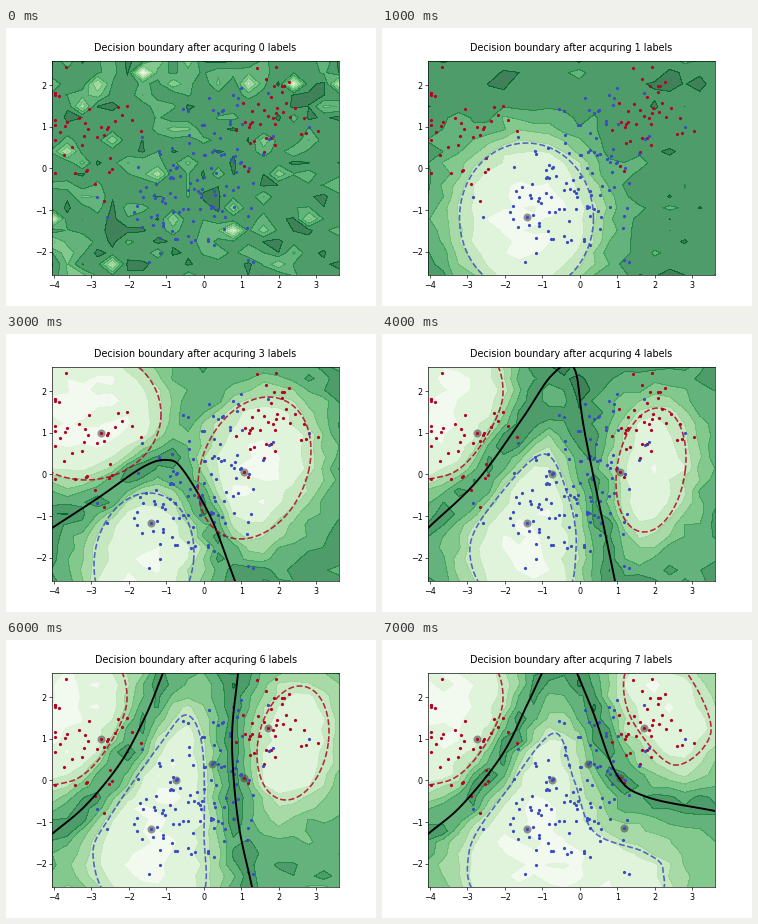
Write a matplotlib script that moves like this. It is 370 px wide and 278 px high and loops after 8 s.

```python
import numpy as np
import matplotlib.pyplot as plt
from matplotlib.animation import FuncAnimation
from matplotlib.path import Path

W, H, DPI = 370, 278, 64
PT = 72 / DPI                      # points per pixel
LEFT, RIGHT, TOP, BOTTOM = 46.25, 333, 33.36, 247.42
BLUE, RED = "#3b4cc0", "#b40426"
LEVELS = np.linspace(0, 1, 9)

plt.rcParams["font.family"] = "DejaVu Sans"
fig = plt.figure(figsize=(W / DPI, H / DPI), dpi=DPI, facecolor="white")
ax = fig.add_axes([LEFT / W, 1 - BOTTOM / H, (RIGHT - LEFT) / W, (BOTTOM - TOP) / H])


def to_data(x, y):
    """Stage pixels to plot units."""
    return (np.asarray(x) - 197.7) / 37.5, (140.5 - np.asarray(y)) / 41.65


def curve(*pts, closed=False):
    """Smooth curve through a few key points."""
    p = np.array(pts, float)
    if closed:
        p = np.vstack([p, p[:1]])
    m = np.gradient(p, axis=0)
    if closed:
        m[0] = m[-1] = (p[1] - p[-2]) / 2
    t = np.linspace(0, 1, 12)[:, None]
    h = t * t * (3 - 2 * t)
    return np.concatenate([
        (1 - h) * a + h * b + t * (1 - t) ** 2 * ma - t * t * (1 - t) * mb
        for a, b, ma, mb in zip(p, p[1:], m, m[1:])])


def loop(*pts):
    return curve(*pts, closed=True)


def ellipse(cx, cy, rx, ry, lean=0):
    """Ellipse whose top leans left by the given phase."""
    t = np.linspace(0, 2 * np.pi, 90)
    return np.column_stack([cx + rx * np.cos(t + lean), cy + ry * np.sin(t)])


# Data cloud: two classes of Gaussian clusters, in stage pixels
rng = np.random.default_rng(8)


def cluster(x, y, sx, sy, count):
    pts = rng.normal((x, y), (sx, sy), (count, 2))
    return np.clip(pts, (LEFT + 3, TOP + 4), (RIGHT - 3, BOTTOM - 4))


red = np.vstack([cluster(82, 102, 25, 28, 38), cluster(264, 92, 20, 25, 38)])
blue = np.vstack([cluster(160, 172, 22, 26, 56), cluster(222, 135, 25, 42, 66)])

# Labelled points in the order they are acquired
labels = [(145, 189, BLUE), (238, 138, RED), (95, 99, RED), (170, 140, BLUE),
          (206, 124, BLUE), (262, 88, RED), (242, 188, BLUE)]


def scene(far=0.8, borders=(), reds=(), blues=()):
    """far: uncertainty away from every confident region."""
    return dict(far=far, borders=borders,
                rings=[(c, RED) for c in reds] + [(c, BLUE) for c in blues])


left_border = curve((46, 194), (80, 165), (115, 122), (140, 75), (157, 33))
left_red = loop((20, 130), (62, 142), (97, 114), (121, 60), (100, 15), (20, 10))
tall_blue = loop((110, 262), (87, 215), (105, 175), (155, 103), (180, 75),
                 (196, 105), (198, 190), (192, 262))

scenes = [
    scene(),
    scene(0.82, blues=[ellipse(144.5, 190, 67, 75)]),
    scene(0.8, [curve((120, 33), (172, 115), (195, 180), (213, 247))],
          reds=[ellipse(249, 134, 56, 71, 0.25)],
          blues=[ellipse(134, 210, 49, 66)]),
    scene(0.8, [curve((46, 194), (92, 164), (137, 133), (161, 126), (177, 136),
                      (205, 184), (229, 247))],
          reds=[ellipse(80, 80, 75, 66), ellipse(248.5, 134, 56.5, 71, 0.25)],
          blues=[ellipse(138, 225, 50, 66, 0.1)]),
    scene(0.77, [curve((46, 194), (95, 147), (140, 85), (170, 41), (192, 34),
                       (203, 100), (233, 247))],
          reds=[left_red, ellipse(269, 136, 35, 62, 0.2)],
          blues=[loop((110, 262), (88, 212), (120, 158), (163, 120), (187, 165),
                      (194, 215), (180, 262))]),
    scene(0.71, [left_border, curve((260, 33), (237, 105), (230, 180), (239, 247))],
          reds=[left_red], blues=[tall_blue]),
    scene(0.68, [left_border, curve((232, 33), (226, 100), (232, 180), (246, 247))],
          reds=[left_red, ellipse(287, 103, 36, 57, 0.2)], blues=[tall_blue]),
    scene(0.62, [curve((46, 194), (80, 165), (120, 115), (145, 65), (160, 33)),
                 curve((195, 33), (211, 72), (235, 135), (265, 157), (333, 171))],
          reds=[left_red, loop((243, 33), (250, 80), (292, 125), (329, 92),
                               (305, 33), (270, 10))],
          blues=[loop((110, 262), (87, 212), (125, 150), (172, 93), (192, 140),
                      (212, 192), (262, 212), (281, 230), (262, 262))]),
]

gx, gy = np.meshgrid(np.linspace(LEFT, RIGHT, 20), np.linspace(BOTTOM, TOP, 20))
nodes = np.column_stack([gx.ravel(), gy.ravel()])


def distance(c):
    """Distance from every grid node to a curve."""
    d = np.hypot(gx[..., None] - c[:, 0], gy[..., None] - c[:, 1])
    return d.min(-1)


def uncertainty(n):
    """Noisy uncertainty: low inside the rings, high along the borders."""
    s = scenes[n]
    z = np.random.default_rng(20 + n).normal(size=gx.shape)
    if not s["rings"]:
        return np.clip(0.93 - 0.125 * np.exp(0.75 * z), 0.02, 0.98)
    outside = np.full(gx.shape, np.inf)
    for c, _ in s["rings"]:
        inside = Path(c).contains_points(nodes).reshape(gx.shape)
        outside = np.minimum(outside, distance(c) * np.where(inside, -1, 1))
    v = 0.1 + (s["far"] - 0.1) / (1 + np.exp((8 - outside) / 13))
    for c in s["borders"]:
        v += (0.84 - v) * 0.9 * np.exp(-(distance(c) / 15) ** 2)
    return np.clip(v + z * (0.02 + 0.035 * v), 0.02, 0.98)


def dots(pts, color, size, **kw):
    ax.scatter(*to_data(*np.array(pts, float).T), s=(size * PT) ** 2,
               color=color, linewidths=0, **kw)


def line(c, color, width, **kw):
    ax.plot(*to_data(*c.T), color=color, lw=width * PT, zorder=5, **kw)


def draw(n):
    ax.clear()
    v = uncertainty(n)
    grid = to_data(gx, gy)
    ax.contourf(*grid, v, LEVELS, cmap="Greens", vmin=0, vmax=1, alpha=0.75)
    ax.contour(*grid, v, LEVELS, cmap="Greens", vmin=0, vmax=1, linewidths=0.5 * PT)

    if n:
        dots([p[:2] for p in labels[:n]], "#404040", 8, alpha=0.55, zorder=3)
    dots(red, RED, 3.2, zorder=4)
    dots(blue, BLUE, 3.2, zorder=4)
    for x, y, color in labels:
        dots([(x, y)], color, 3.2, zorder=4)

    for c in scenes[n]["borders"]:
        line(c, "black", 1.9)
    for c, color in scenes[n]["rings"]:
        line(c, color, 1.6, ls="--", alpha=0.85)

    x, y = to_data((LEFT, RIGHT), (BOTTOM, TOP))
    ax.set_xlim(*x)
    ax.set_ylim(*y)
    ax.set_xticks(range(-4, 4))
    ax.set_yticks(range(-2, 3))
    ax.tick_params(labelsize=8.03 * PT, length=2.8 * PT, width=0.64 * PT, pad=2.8 * PT)
    for side in ax.spines.values():
        side.set_linewidth(0.64 * PT)
    ax.set_title(f"Decision boundary after acquring {n} labels",
                 fontsize=9.63 * PT, pad=10.4 * PT)
    return []


anim = FuncAnimation(fig, draw, frames=len(scenes), interval=1000,
                     repeat=True, repeat_delay=0)
plt.show()
```
